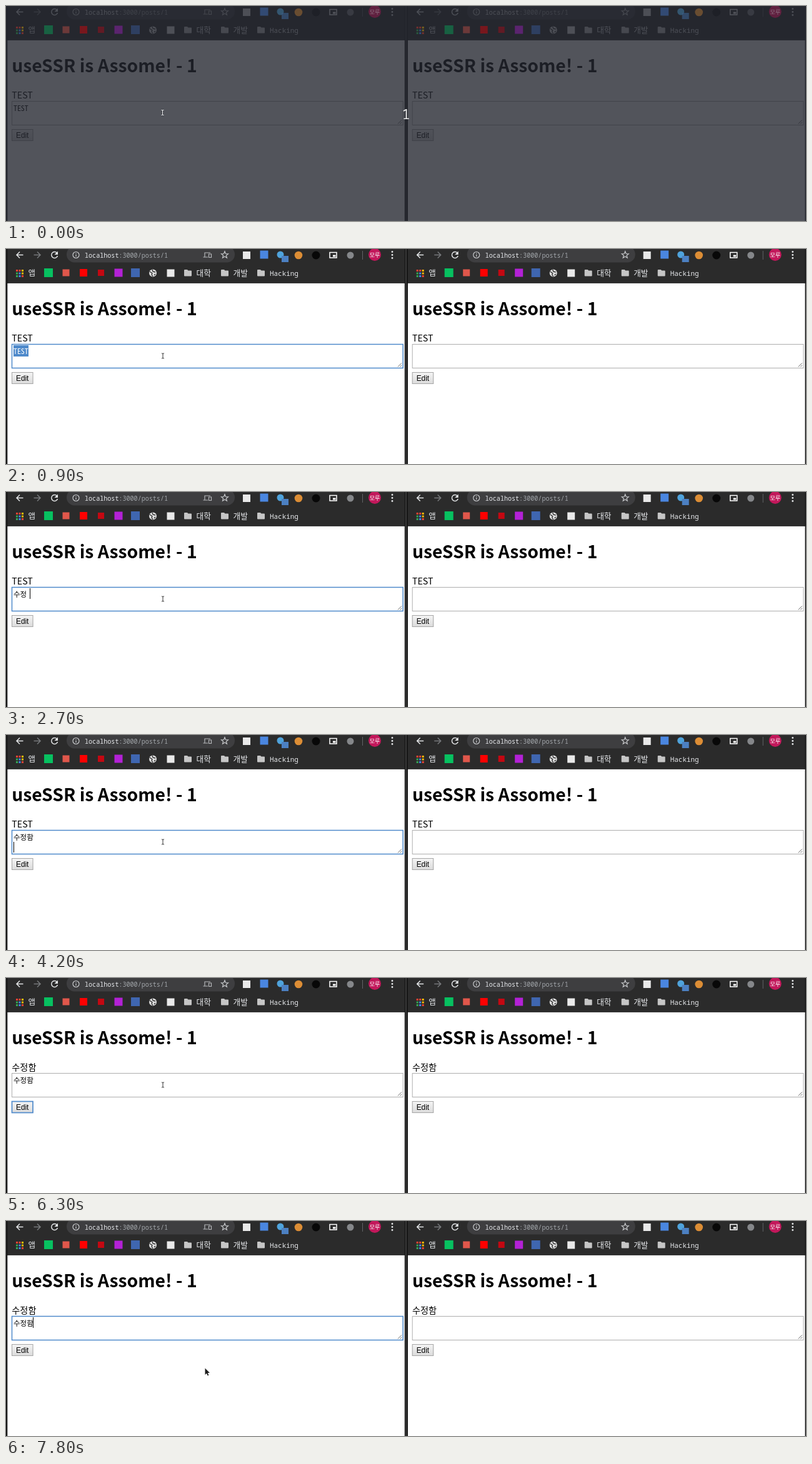
These frames come from a looping animation (1280x344 px, 8 s). An HTML page with a canvas:

```html
<!DOCTYPE html>
<html lang="ko">
<head>
<meta charset="utf-8">
<title>useSSR demo</title>
<style>
  html, body { margin: 0; width: 100%; height: 100%; overflow: hidden; background: #fff; }
  canvas { display: block; }
</style>
</head>
<body>
<canvas id="stage" width="1280" height="344"></canvas>
<script>
const ctx = document.getElementById('stage').getContext('2d');
const LOOP = 8000, PANE = 640.7;
const SANS = '"Noto Sans CJK KR", "Noto Sans CJK", "Noto Sans CJK JP", sans-serif';
const MONO = '"Noto Sans Mono", "DejaVu Sans Mono", monospace';
const NARROW = '"Noto Sans Mono CJK KR", "Noto Sans Mono CJK JP", "Noto Sans CJK KR", monospace';
const ICON = '#e4e6e8', FOCUS = '#4f8acb';

// Editor states: start time, text, caret [x, y], underlined glyph x, focus
const EDITS = [
  { at: 0, text: 'TEST' },
  { at: 800, text: 'TEST', caret: [35, 154], focus: 'area' },
  { at: 900, text: 'TEST', selected: true, focus: 'area' },
  { at: 1400, text: '', caret: [12, 154], focus: 'area' },
  { at: 2000, text: '', focus: 'area' },
  { at: 2200, text: '수', compose: 12.5, focus: 'area' },
  { at: 2400, text: '수저', compose: 23, focus: 'area' },
  { at: 2600, text: '수정', compose: 23, focus: 'area' },
  { at: 2700, text: '수정', caret: [38, 154], focus: 'area' },
  { at: 3200, text: '수정', tail: 'ㅎ', compose: 39, focus: 'area' },
  { at: 3400, text: '수정', tail: '하', compose: 39, focus: 'area' },
  { at: 3600, text: '수정', caret: [38, 154], focus: 'area' },
  { at: 3700, text: '수정', caret: [33, 154], focus: 'area' },
  { at: 3900, text: '수정하', compose: 33.5, focus: 'area' },
  { at: 4100, text: '수정함', compose: 33.5, focus: 'area' },
  { at: 4200, text: '수정함', caret: [12, 171], focus: 'area' },
  { at: 4600, text: '수정함', focus: 'button' },
  { at: 7400, text: '수정함', caret: [43, 154], focus: 'area' }
];

function rect(x, y, w, h, color) {
  ctx.fillStyle = color;
  ctx.fillRect(x, y, w, h);
}
function frame(x, y, w, h, color, width = 1) {
  ctx.strokeStyle = color;
  ctx.lineWidth = width;
  ctx.strokeRect(x, y, w, h);
}
function disc(x, y, r, color) {
  ctx.fillStyle = color;
  ctx.beginPath();
  ctx.arc(x, y, r, 0, Math.PI * 2);
  ctx.fill();
}
function square(x, y, size, color) {
  rect(x - size / 2, y - size / 2, size, size, color);
}
function line(path, color = ICON, width = 1.5) {
  ctx.strokeStyle = color;
  ctx.lineWidth = width;
  ctx.stroke(new Path2D(path));
}
function shape(path, color) {
  ctx.fillStyle = color;
  ctx.fill(new Path2D(path));
}
function text(str, x, y, size, color = '#000', family = SANS, weight = 400) {
  ctx.font = `${weight} ${size}px ${family}`;
  ctx.fillStyle = color;
  ctx.fillText(str, x, y);
}

function folder(x) {
  shape(`M${x - 6} 34q0-1 1-1h4l1.5 1.5h4.5q1 0 1 1v7q0 1-1 1h-10q-1 0-1-1z`, '#c6c6c6');
}

function star(x, y) {
  let path = '';
  for (let i = 0; i < 10; i++) {
    const r = i % 2 ? 2.5 : 5.8, a = i * Math.PI / 5 - Math.PI / 2;
    path += `${i ? 'L' : 'M'}${x + r * Math.cos(a)} ${y + r * Math.sin(a)}`;
  }
  line(path + 'z', '#c8cacc', 1.2);
}

function coloredIcons() {
  ['#ea4335', '#ea4335', '#fbbc05', '#34a853', '#4285f4', '#fbbc05', '#34a853', '#4285f4', '#ea4335']
    .forEach((color, i) => rect(16 + i % 3 * 4.5, 33 + Math.floor(i / 3) * 4.5, 3, 3, color));
  square(68, 38, 14, '#07c160');
  square(96, 38, 11, '#e0574b');
  square(124, 38, 12, '#f00');
  square(152, 38, 10, '#c40812');
  square(180, 38, 13, '#b321d6');
  square(207, 38, 14, '#3f66b0');
  square(413, 9, 13, '#4a86e0');
  disc(439, 9, 5.5, '#4fa3dc');
  rect(441, 11, 11, 10, '#4c80c2');
  disc(468, 10, 6.3, '#dc8d35');
  disc(590, 9, 10, '#c2185b');
  ctx.textAlign = 'center';
  text('모루', 590, 12.5, 9, '#fff');
  ctx.textAlign = 'left';
}

function browserBar(withDevices) {
  rect(2.3, 0, 635.5, 54, '#2b2b2b');
  rect(2.3, 54, 635.5, 1, '#3c3c3c');
  ctx.fillStyle = '#3e3e40';
  ctx.beginPath();
  ctx.roundRect(97, -4, 269, 25.5, 12.5);
  ctx.fill();

  line('M27.5 9.5H17M22 4.5L17 9.5L22 14.5');
  line('M44.5 9.5H55M50 4.5L55 9.5L50 14.5', '#77797c');
  line('M81.5 6.2A5 5 0 1 0 82.5 11');
  shape('M83 3.5v5.5h-5.5z', ICON);
  line('M107 9.5a5 5 0 1 0 10 0a5 5 0 1 0-10 0M112 8.7v3.6M112 6.3v1.3', '#c8cacc', 1.2);
  text('localhost', 126, 13.5, 10.08, '#e8eaed', MONO);
  text(':3000/posts/1', 180.4, 13.5, 10.08, '#a3a7ab', MONO);
  if (withDevices) line('M327 6H318V12.5M315.5 13H323M324.5 8h4v5.5h-4z', '#b5b7ba', 1.2);
  star(350, 9.5);

  square(385, 10, 12, '#e9e9e9');
  disc(496, 10, 6.5, '#080808');
  frame(518, 5.5, 11, 8.5, '#fff', 1.5);
  rect(523, 9.5, 4.5, 3, '#fff');
  disc(551, 10, 5.5, '#85878a');
  rect(570, 3, 1, 14, '#626466');
  [4.5, 9.5, 14.5].forEach(y => disc(618, y, 1.4, ICON));

  text('앱', 35.5, 43, 12.5, '#e8eaed');
  disc(235, 38.5, 6, '#dedede');
  line('M230 36l4 3-1 2 2 3M234 33l1 3 4 1M237 42l2-2', '#2b2b2b', 1.3);
  square(263.5, 38.5, 12, '#e9e9e9');
  [291, 350, 408].forEach(folder);
  text('대학', 304.5, 43, 12.7, '#e8eaed');
  text('개발', 363.5, 43, 12.7, '#e8eaed');
  text('Hacking', 422, 42.5, 10.95, '#e8eaed', MONO);
  coloredIcons();
}

function editor(state) {
  const { text: value, tail, caret, compose, selected, focus } = state;
  const active = focus === 'area';
  frame(9.5, 152.5, 625.7, 38, active ? FOCUS : '#aeaeae', active ? 1.5 : 1);
  line('M627 188.5l6-6M630.5 188.5l2.5-2.5', '#555', 0.9);
  if (selected) rect(12, 154, 24, 18, FOCUS);
  if (value === 'TEST') text(value, 12, 168, 11.85, selected ? '#fff' : '#000', NARROW);
  else text(value, 12, 168, 11.5);
  if (tail) text(tail, 38.7, 168, 11.5);
  if (compose) rect(compose, 170, 10.5, 1, '#000');
  if (caret) rect(caret[0], caret[1], 1, 17, '#000');

  const face = ctx.createLinearGradient(0, 198, 0, 215);
  face.addColorStop(0, '#f4f4f4');
  face.addColorStop(1, '#dcdcdc');
  rect(9, 197, 34.5, 19, face);
  const pressed = focus === 'button';
  frame(9.5, 197.5, 33.5, 18, pressed ? FOCUS : '#a6a6a6', pressed ? 1.7 : 1);
  text('Edit', 16, 211, 11.85, '#000', '"Liberation Sans", Arial, sans-serif');
}

function pane(offset, label, state) {
  ctx.save();
  ctx.translate(offset, 0);
  rect(2.3, 55, 635.5, 289, '#fff');
  browserBar(offset === 0);
  text('useSSR is Assome! - 1', 9.2, 106, 28.35, '#000', SANS, 700);
  text(label, 9.3, 148, 14.2);
  editor(state);
  ctx.restore();
}

function beam(x, y, color, edge) {
  const path = `M${x - 2} ${y - 4}h1.5l.5.5.5-.5h1.5M${x} ${y - 4}v8M${x - 2} ${y + 4}h1.5l.5-.5.5.5h1.5`;
  line(path, edge, 2.4);
  line(path, color, 1);
}

function arrow(x, y) {
  const path = `M${x} ${y}v10.5l2.5-2.3 1.7 3.8 1.7-.8-1.7-3.6h3.3z`;
  line(path, '#fff', 1.6);
  shape(path, '#1c1c1c');
}

function countdown() {
  rect(0, 0, 1280, 344, 'rgba(36,39,47,.79)');
  ctx.globalAlpha = 0.22;
  for (const x of [0, PANE]) {
    ctx.save();
    ctx.translate(x, 0);
    coloredIcons();
    ctx.restore();
  }
  ctx.globalAlpha = 1;
  ctx.textAlign = 'center';
  text('1', 640, 181, 21.5, '#f2f2f2', MONO);
  ctx.textAlign = 'left';
}

function draw(t) {
  const state = EDITS.findLast(edit => t >= edit.at);
  rect(0, 0, 1280, 344, '#161616');
  rect(639, 0, 2, 344, '#3a3a3a');
  pane(0, t < 4900 ? 'TEST' : '수정함', state);
  pane(PANE, t < 6300 ? 'TEST' : '수정함', { text: '' });
  if (t < 500) countdown();

  if (t < 500) beam(250.5, 170.5, '#f4f4f4', '#3a3d44');
  else if (t < 7700) beam(251, 171, '#333', '#fff');
  else if (t < 7800) arrow(292, 208);
  else arrow(318.5, 235.5);
}

function tick() {
  draw(performance.now() % LOOP);
  requestAnimationFrame(tick);
}
tick();
</script>
</body>
</html>
```
